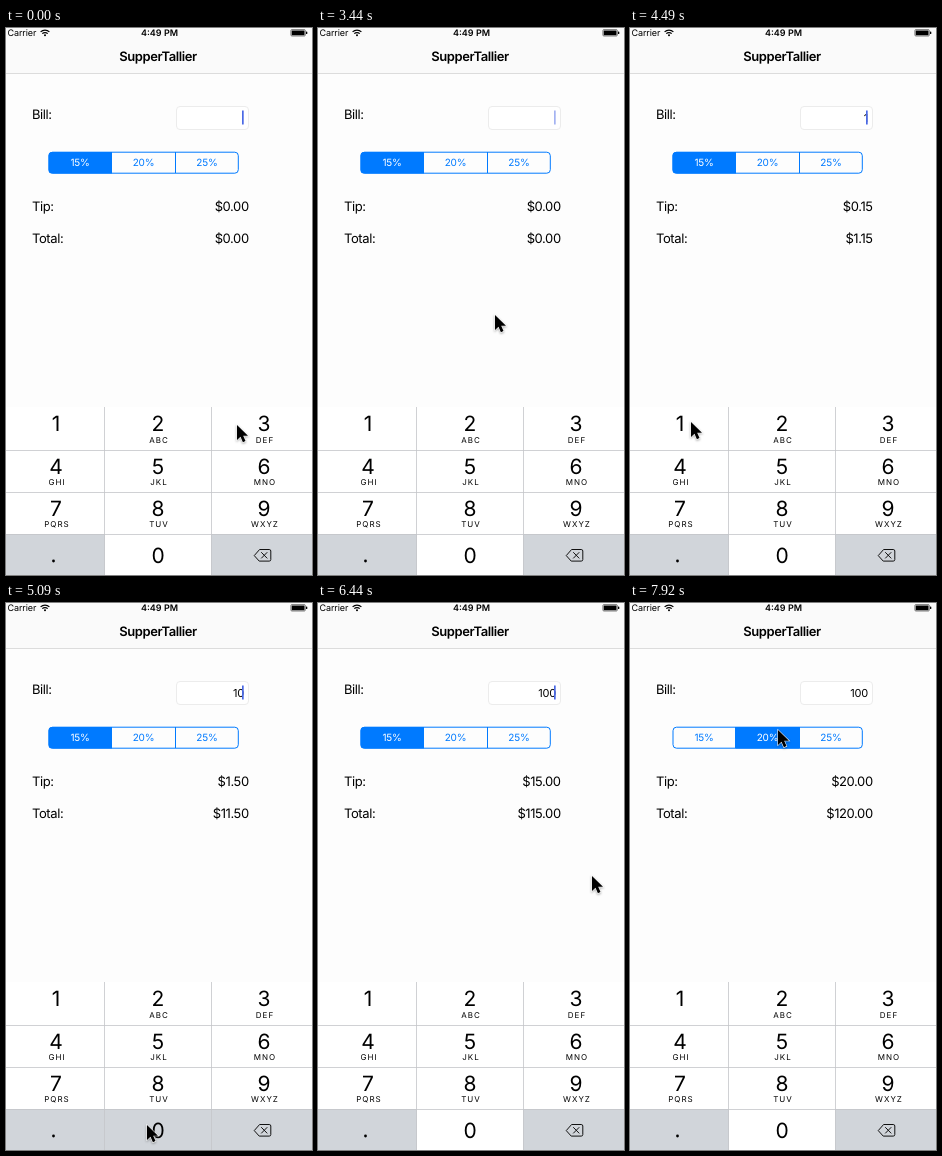
An HTML page for the animation above (8 s loop, 306 by 547 pixels).

```html
<!DOCTYPE html>
<html lang="en">
<head>
<meta charset="utf-8">
<title>SupperTallier</title>
<style>
  html, body { margin: 0; width: 100%; height: 100%; overflow: hidden; background: #fdfdfd; }
  svg { display: block; width: 306px; height: 547px; font-family: Inter, sans-serif; text-rendering: geometricPrecision; }
  .label { font-size: 13px; letter-spacing: -.4px; }
  .small { font-size: 9px; }
  .digit { font-size: 21px; }
  .letters { font-size: 8px; letter-spacing: 1px; }
  .segment { font-size: 10px; letter-spacing: -.2px; }
  .middle { text-anchor: middle; }
  .end { text-anchor: end; }
</style>
</head>
<body>
<svg viewBox="0 0 306 547">
  <rect width="306" height="45" fill="#fafafa"/>
  <path d="M0 45.5H306" stroke="#dcdcdc"/>

  <text class="small" x="1.5" y="8" letter-spacing="-.1">Carrier</text>
  <g fill="none" stroke="#000" stroke-width="1.2">
    <path d="M34.6 3.9a6.3 6.3 0 0 1 8.8 0M36.3 5.7a3.8 3.8 0 0 1 5.4 0"/>
  </g>
  <circle cx="39" cy="7.3" r="1"/>
  <text class="small middle" x="153.5" y="8" font-weight="600">4:49 PM</text>
  <rect x="284.9" y="1.6" width="14.4" height="6.4" rx="1" fill="none" stroke="#000" stroke-width=".5"/>
  <rect x="285.7" y="2.4" width="12.8" height="4.8" rx=".4"/>
  <rect x="300" y="3.6" width="1.3" height="2.4" rx=".5"/>

  <text class="label middle" x="152" y="33" font-weight="600">SupperTallier</text>

  <text class="label" x="26" y="91">Bill:</text>
  <text class="label" x="26" y="183">Tip:</text>
  <text class="label" x="26" y="215">Total:</text>
  <rect x="170.5" y="78.5" width="72" height="23" rx="3.5" fill="#fff" stroke="#ececec"/>
  <text id="bill" class="end" x="238" y="94" font-size="11" letter-spacing="-.2"></text>
  <rect id="caret" x="236" y="82.5" width="1.7" height="14" fill="#4a69e5"/>
  <text id="tip" class="label end" x="242.7" y="183"></text>
  <text id="total" class="label end" x="242.7" y="215"></text>

  <clipPath id="pill"><rect x="42.5" y="124" width="190" height="21.5" rx="3.5"/></clipPath>
  <rect id="selection" y="124" width="64" height="22" fill="#007aff" clip-path="url(#pill)"/>
  <g fill="none" stroke="#007aff">
    <rect x="43" y="124.2" width="189.3" height="21" rx="3.5"/>
    <path d="M105.5 124V145M169.5 124V145"/>
  </g>
  <g id="segments"></g>

  <rect y="379" width="306" height="168" fill="#fff"/>
  <rect y="506" width="99" height="41" fill="#d1d5da"/>
  <rect x="205" y="506" width="101" height="41" fill="#d1d5da"/>
  <rect id="pressed" height="42" fill="#d1d5da"/>
  <path d="M98.5 379V547M205.5 379V547M0 422.5H306M0 464.5H306M0 506.5H306" stroke="#c4c6c9" stroke-width=".8"/>
  <g id="keys"></g>
  <circle cx="47.5" cy="533" r="1.4"/>
  <g fill="none" stroke="#111" stroke-linejoin="round" stroke-linecap="round">
    <path d="M248.5 527.3L253.6 521.5H263.2Q264.8 521.5 264.8 523V531.6Q264.8 533.1 263.2 533.1H253.6Z"/>
    <path d="M255.5 524.5L261 530.1M261 524.5L255.5 530.1"/>
  </g>

  <path id="cursor" d="M0 0V15L3.5 11.7L5.9 17.2L8.5 16.1L6.2 10.7H11Z" stroke="#fff" stroke-width="1.1"
        paint-order="stroke" style="filter: drop-shadow(0 1px .8px #0005)"/>
</svg>
<script>
const $ = id => document.getElementById(id);
const LOOP = 8000, TICK = 149.4;
const columns = [50, 152, 258];

// Pointer stops: tick, x, y
const stops = [
  [0, 231, 397], [6, 231, 397], [12, 179, 283], [13, 177, 287], [25, 177, 287], [28, 61, 394],
  [30, 61, 394], [32, 141, 521], [33, 141, 522], [38, 141, 522], [39, 143, 525], [43, 274, 273],
  [44, 294, 222], [45, 282, 197], [48, 129, 130], [51, 129, 130], [52, 140, 129], [53, 148, 127]
];
// Caret blinks: fading tick, tick when it is back
const blinks = [[3, 7], [10, 14], [17, 20], [23, 26], [39, 42], [45, 49], [52, 60]];

const text = (cls, x, y, content) => `<text class="${cls} middle" x="${x}" y="${y}">${content}</text>`;

const rows = [['1', '2ABC', '3DEF'], ['4GHI', '5JKL', '6MNO'], ['7PQRS', '8TUV', '9WXYZ'], ['', '0', '']];
const baselines = [403, 445.5, 487.5, 534.5];
$('keys').innerHTML = rows.map((row, r) => row.map((key, c) =>
  text('digit', columns[c], baselines[r], key.slice(0, 1)) +
  text('letters', columns[c] + 1, baselines[r] + 11.7, key.slice(1))
).join('')).join('');

$('segments').innerHTML = [15, 20, 25].map((rate, i) =>
  text('segment', 74 + i * 63.5, 138.3, rate + '%')).join('');

function pointerAt(tick) {
  const i = stops.findIndex(s => s[0] >= tick);
  if (i < 1) return stops[0].slice(1);
  const [t0, x0, y0] = stops[i - 1], [t1, x1, y1] = stops[i];
  const u = (tick - t0) / (t1 - t0), e = u * u * (3 - 2 * u);
  return [x0 + (x1 - x0) * e, y0 + (y1 - y0) * e];
}

function caretAt(tick) {
  const blink = blinks.find(([off, on]) => tick >= off && tick < on);
  return !blink ? 1 : tick === blink[0] ? .5 : 0;
}

function press(tick) {
  const one = tick === 29, zero = tick === 33 || tick === 34;
  const key = $('pressed');
  key.setAttribute('x', zero ? 99 : 0);
  key.setAttribute('y', zero ? 506 : 380);
  key.setAttribute('width', one ? 98 : zero ? 106 : 0);
}

function draw(now) {
  const tick = Math.floor(now % LOOP / TICK);
  const bill = tick < 30 ? '' : tick < 34 ? '1' : tick < 35 ? '10' : '100';
  const choice = tick < 49 ? 0 : 1;
  const tip = bill * (choice ? .2 : .15);

  $('bill').textContent = bill;
  $('tip').textContent = '$' + tip.toFixed(2);
  $('total').textContent = '$' + (+bill + tip).toFixed(2);
  $('caret').setAttribute('opacity', caretAt(tick));
  $('selection').setAttribute('x', choice ? 105.5 : 42);
  [...$('segments').children].forEach((el, i) => el.setAttribute('fill', i === choice ? '#fff' : '#007aff'));
  press(tick);
  $('cursor').setAttribute('transform', `translate(${pointerAt(tick)})`);
}

const start = performance.now();
function frame() {
  draw(performance.now() - start);
  requestAnimationFrame(frame);
}
frame();
</script>
</body>
</html>
```
